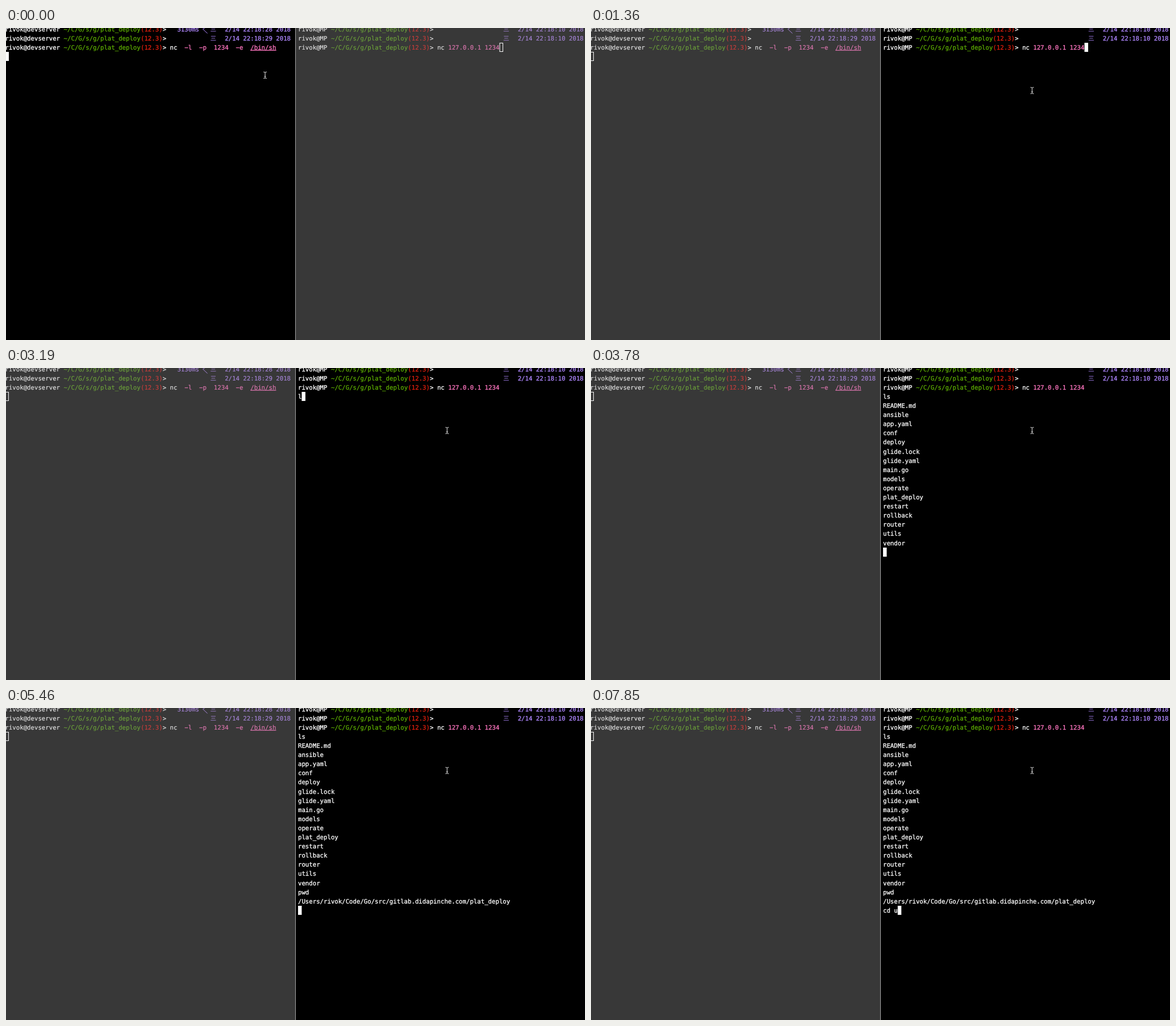
These frames come from a looping animation (1019x549 px, 8000 ms). An HTML page:

```html
<!DOCTYPE html>
<html lang="en">
<head>
<meta charset="utf-8">
<title>Terminal</title>
<style>
html, body { margin: 0; width: 100%; height: 100%; overflow: hidden; background: #000; }
svg { display: block; width: 1019px; height: 549px; }
text {
  font: 10.705px "DejaVu Sans Mono", monospace;
  white-space: pre;
  text-rendering: geometricPrecision;
  fill: var(--ink);
  stroke: var(--ink);
  stroke-width: var(--weight);
}
.pane { --bg: #383838; --ink: #e2e2e2; --green: #6b9f3a; --red: #c73e3c; --pink: #db76ae; --purple: #a584d6; --weight: .15px; }
.pane.on { --bg: #000; --ink: #fff; --green: #5aa802; --red: #de1f0e; --pink: #ff76c0; --purple: #af87ff; --weight: .3px; }
.bg { fill: var(--bg); }
.pane .green { --ink: var(--green); }
.pane .red { --ink: var(--red); }
.pane .pink { --ink: var(--pink); }
.pane .purple, .pane .cjk { --ink: var(--purple); }
.pane .cjk { font-family: "Noto Sans CJK SC", "Noto Sans CJK", sans-serif; font-weight: 300; stroke: none; }
.line { text-decoration: underline; text-decoration-skip-ink: none; }
.chevron { fill: none; stroke: var(--purple); stroke-width: 1; }
.cursor { fill: none; stroke: #fff; stroke-width: 1; }
.on .cursor { fill: #fff; }
</style>
</head>
<body>
<svg id="stage" viewBox="0 0 1019 549"></svg>
<script>
const LOOP = 8000, CELL = 6.445, ROW = 16.1, TOP = 26, BASE = 11.8;
const USER = "rivok", HOST = "devserver";
const FILES = "README.md ansible app.yaml conf deploy glide.lock glide.yaml main.go models " +
  "operate plat_deploy restart rollback router utils vendor";

// Text added to the right pane at each time
const OUTPUT = [
  [2110, "\n"],
  [3190, "l"], [3490, "s"],
  [3780, "\n" + FILES.split(" ").join("\n") + "\n"],
  [4680, "p"], [4860, "w"], [5010, "d"],
  [5460, `\n/Users/${USER}/Code/Go/src/gitlab.didapinche.com/plat_deploy\n`],
  [7110, "c"], [7410, "d"], [7560, " "], [7850, "u"]
];
const POINTER = [[0, 456, 83], [440, 515.5, 91], [620, 733, 117], [920, 767, 110.5], [1070, 776.3, 110]];
const FOCUS_AT = 1360, ROWS = 21, PROMPT_END = 55;

const stage = document.getElementById("stage");

function add(parent, tag, attrs) {
  const el = document.createElementNS("http://www.w3.org/2000/svg", tag);
  for (const key in attrs) el.setAttribute(key, attrs[key]);
  return parent.appendChild(el);
}

function makePane(x, width, left) {
  const g = add(stage, "g", { class: "pane" });
  add(g, "rect", { class: "bg", x, y: 0, width, height: 549 });
  const put = (row, col, str, cls = "") => {
    const el = add(g, "text", { x: left + col * CELL, y: TOP + row * ROW + BASE, class: cls });
    el.textContent = str;
    return el;
  };
  const prompt = (row, host) => {
    const who = `${USER}@${host} `;
    let col = who.length;
    put(row, 0, who);
    put(row, col, "~/C/G/s/g/plat_deploy", "green");
    put(row, col += 21, "(12.3)", "red");
    put(row, col += 6, ">");
  };
  const date = (row, time) => {
    put(row, 56, "三", "cjk");
    put(row, 60, `2/14 ${time} 2018`, "purple");
  };
  const cursor = add(g, "rect", { class: "cursor", width: CELL - 1, height: 15 });
  const moveCursor = (row, col) => {
    cursor.setAttribute("x", left + col * CELL + 0.5);
    cursor.setAttribute("y", Math.round(TOP + row * ROW) + 0.5);
  };
  return { g, put, prompt, date, moveCursor };
}

const server = makePane(0, 509, -1.5);
for (const row of [-2, -1, 0]) server.prompt(row, HOST);
server.put(-2, 47, "3130ms", "purple");
add(server.g, "path", { class: "chevron", d: "M354-3L346.5 2L354.5 9.5" });
server.date(-2, "22:18:28");
server.date(-1, "22:18:29");
server.put(0, 45, "nc");
[[49, "−l"], [53, "−p"], [57, "1234"], [63, "−e"]].forEach(([col, s]) => server.put(0, col, s, "pink"));
server.put(0, 67, "/bin/sh", "pink line");
server.moveCursor(1, 0);

const client = makePane(510, 509, 514);
for (const row of [-2, -1, 0]) client.prompt(row, "MP");
client.date(-2, "22:18:10");
client.date(-1, "22:18:10");
client.put(0, 38, "nc");
client.put(0, 41, "127.0.0.1 1234", "pink");
const lines = Array.from({ length: ROWS }, (_, row) => client.put(row, 0, ""));

add(stage, "rect", { x: 509, y: 0, width: 1, height: 549, fill: "#a4a4a4" });

const pointer = add(stage, "g", { fill: "none", "stroke-linecap": "round" });
const beam = "M-2.4-5.6Q-.3-5.6 0-4.5Q.3-5.6 2.4-5.6M0-4.5V4.5M-2.4 5.6Q-.3 5.6 0 4.5Q.3 5.6 2.4 5.6M-1 2.2H1";
add(pointer, "path", { d: beam, stroke: "#222", "stroke-width": 2 });
add(pointer, "path", { d: beam, stroke: "#e4e4e4", "stroke-width": 0.9 });

let shown = null;

function draw(t) {
  const text = OUTPUT.filter(([at]) => at <= t).map(([, s]) => s).join("");
  if (text !== shown) {
    shown = text;
    const rows = text.split("\n"), last = rows.length - 1;
    lines.forEach((el, i) => { el.textContent = rows[i] || ""; });
    client.moveCursor(last, last ? rows[last].length : PROMPT_END);
  }
  const focused = t >= FOCUS_AT;
  server.g.classList.toggle("on", !focused);
  client.g.classList.toggle("on", focused);
  const [, x, y] = POINTER.filter(([at]) => at <= t).pop();
  pointer.setAttribute("transform", `translate(${x} ${y})`);
}

const start = performance.now();
function tick() {
  draw((performance.now() - start) % LOOP);
  requestAnimationFrame(tick);
}
tick();
</script>
</body>
</html>
```
